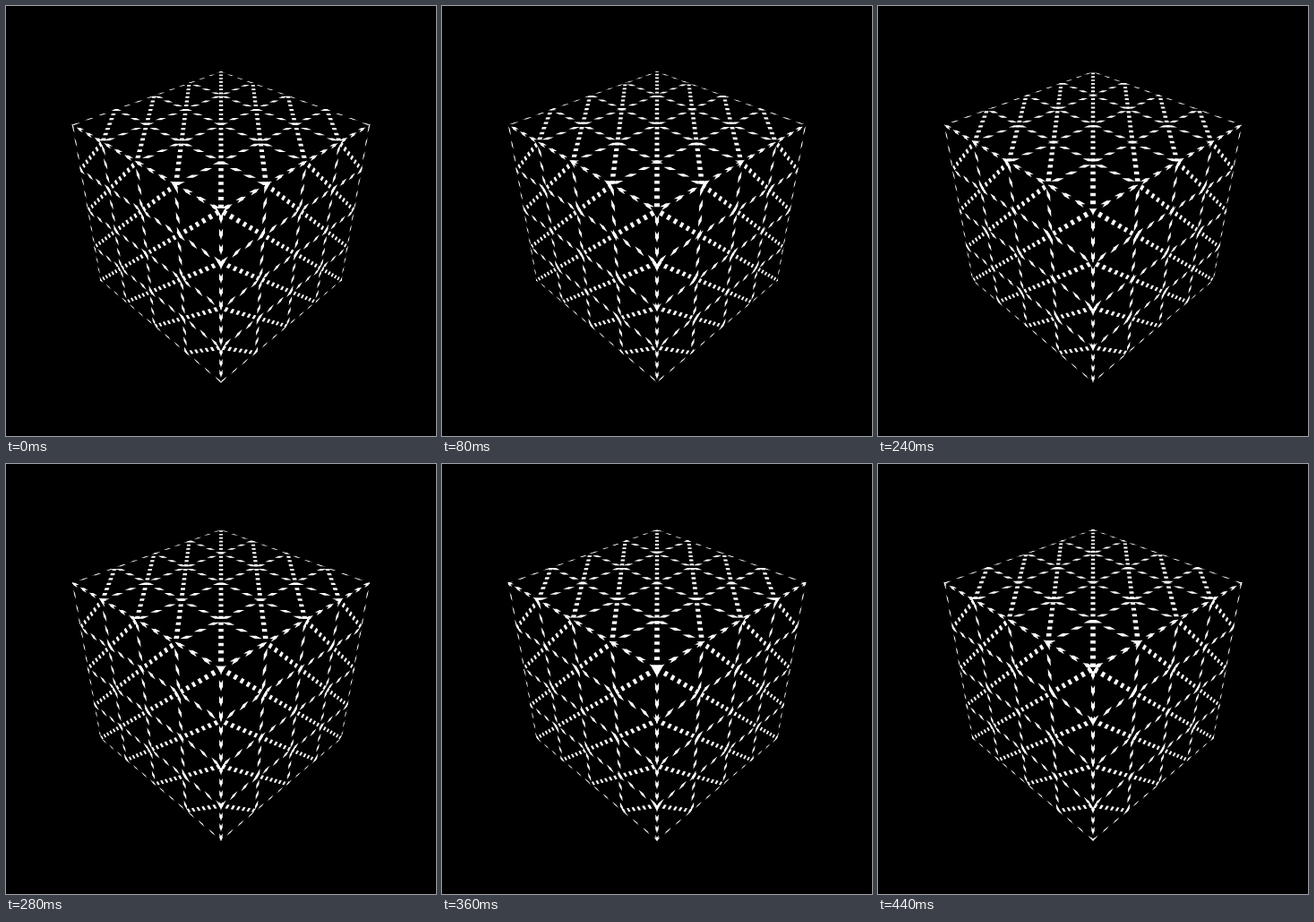
Write an HTML page with a canvas that moves like this. It is 480x480 px and loops after 480 ms.

```html
<!DOCTYPE html>
<html lang="en">
<head>
<meta charset="utf-8">
<title>Dashed cube</title>
<style>
  html, body { margin: 0; width: 100%; height: 100%; overflow: hidden; background: #000; }
  canvas { display: block; }
</style>
</head>
<body>
<canvas id="stage" width="480" height="480"></canvas>
<script>
const ctx = document.getElementById('stage').getContext('2d');

const LOOP = 480, STEP = 40;
const CELLS = 4;                  // grid cells along a cube edge
const BANDS = CELLS / 0.3;        // dash periods along a cube edge
const DUTY = 0.43;                // lit share of a dash period
const PHASE = 0.29;
const HALF = 0.01;                // half the line width, in cube edges
const FOCAL = 473.1, NEAR = 1.887, DEPTH = 1 / Math.sqrt(3);
const NODE = { x: 240, y: 228.5 }; // the cube corner nearest the viewer

// Screen directions of the three edges that leave the near corner
const AXES = [-150, -30, 90].map(deg => {
  const a = deg * Math.PI / 180;
  return { x: Math.cos(a), y: Math.sin(a) };
});

function project(face, u, v) {
  const a = AXES[face], b = AXES[(face + 1) % 3];
  const scale = FOCAL / (NEAR + (u + v) * DEPTH);
  return [NODE.x + (a.x * u + b.x * v) * scale,
          NODE.y + (a.y * u + b.y * v) * scale];
}

function tracePolygon(face, points) {
  ctx.beginPath();
  for (const [u, v] of points) ctx.lineTo(...project(face, u, v));
  ctx.closePath();
}

function fillPolygon(face, points) {
  tracePolygon(face, points);
  ctx.fill();
}

// Parts of all lines that lie in the band from <= u + v <= to
function drawBand(face, from, to) {
  for (let k = 0; k <= CELLS; k++) {
    const lo = k / CELLS - HALF, hi = k / CELLS + HALF;
    if (to < lo || from > hi + 1) continue;
    const dash = [[from - lo, lo], [to - lo, lo], [to - hi, hi], [from - hi, hi]];
    fillPolygon(face, dash);
    fillPolygon(face, dash.map(([u, v]) => [v, u]));
  }
  for (let k = 1 - CELLS; k < CELLS; k++) {
    const lo = k / CELLS - HALF * Math.SQRT2, hi = k / CELLS + HALF * Math.SQRT2;
    const at = (sum, diff) => [(sum + diff) / 2, (sum - diff) / 2];
    fillPolygon(face, [at(from, lo), at(to, lo), at(to, hi), at(from, hi)]);
  }
}

function drawFace(face, shift) {
  const edge = -0.002; // slight overlap hides the seam between faces
  ctx.save();
  tracePolygon(face, [[edge, edge], [1, edge], [1, 1], [edge, 1]]);
  ctx.clip();
  for (let j = -1; j <= 2 * BANDS + 1; j++) {
    const from = (j + shift) / BANDS;
    drawBand(face, from, from + DUTY / BANDS);
  }
  ctx.restore();
}

function draw(ms) {
  const time = Math.floor(ms % LOOP / STEP) * STEP;
  const shift = (time / LOOP + PHASE) % 1;
  ctx.fillStyle = '#000';
  ctx.fillRect(0, 0, 480, 480);
  ctx.fillStyle = '#fff';
  for (let face = 0; face < 3; face++) drawFace(face, shift);
}

function tick() {
  draw(performance.now());
  requestAnimationFrame(tick);
}
draw(0);
requestAnimationFrame(tick);
</script>
</body>
</html>
```
